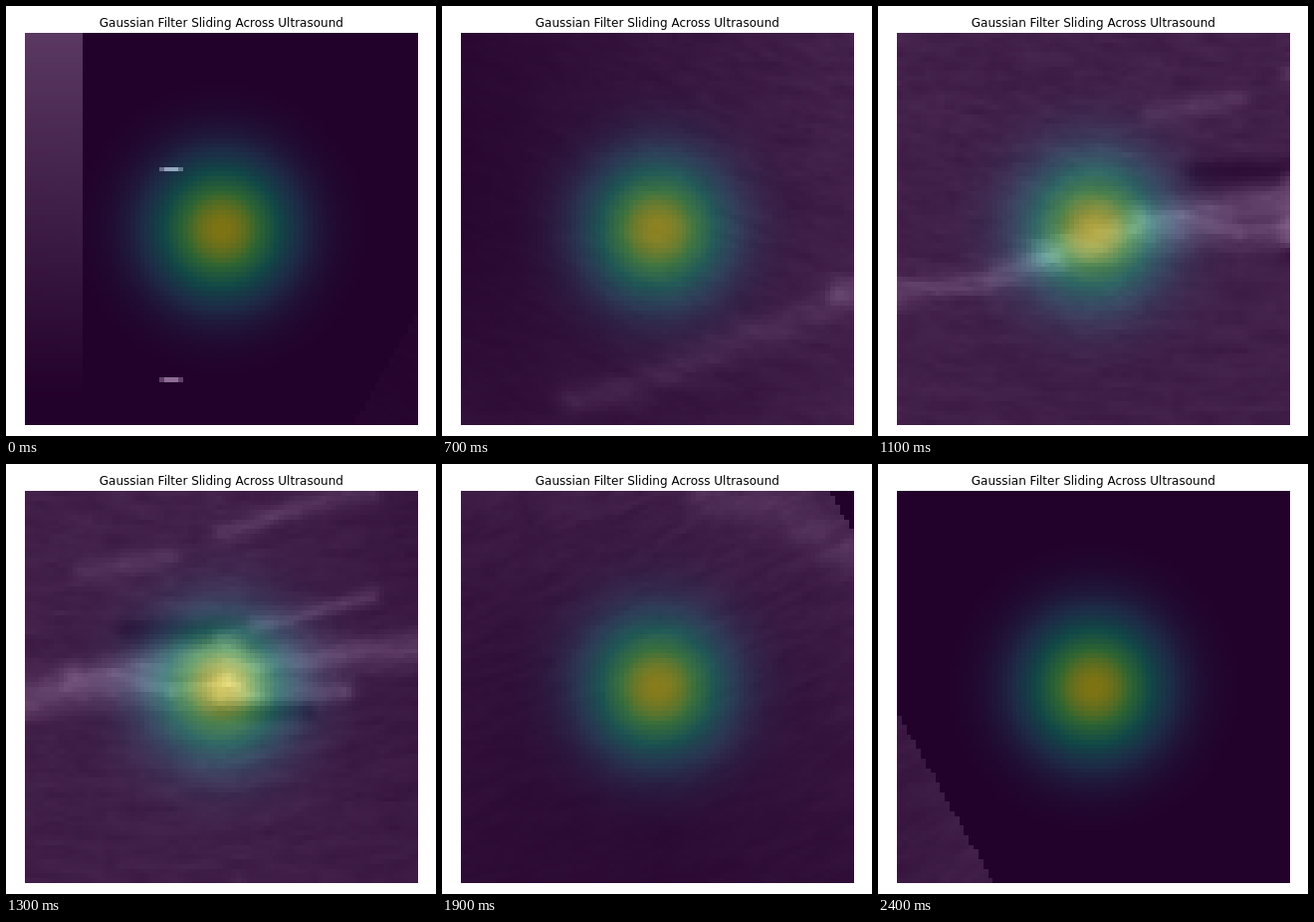
An HTML page with a canvas that plays this animation: 432 by 432 pixels, repeating every 2500 ms.

```html
<!DOCTYPE html>
<html lang="en">
<head>
<meta charset="utf-8">
<title>Gaussian Filter</title>
<style>
html, body { margin: 0; width: 432px; height: 432px; overflow: hidden; background: #fff; }
canvas { display: block; }
</style>
</head>
<body>
<canvas id="stage" width="432" height="432"></canvas>
<script>
const N = 82, STRIDE = 20.5, STEPS = 25, STEP_MS = 100, SIGMA = 10.2;
const W = Math.floor(STRIDE * (STEPS - 1)) + N;

// Scan sector: apex and half-width per row
const APEX_X = 290.4, APEX_Y = -310, SPREAD = 0.566;

// Tissue brightness every 41 columns, one line per height
const BASE_X = 61.5, BASE_DX = 41;
const top_ = [6, 8, 14, 40, 64, 60, 65, 42, 52, 60, 70, 60];
const middle = [6, 8, 12, 30, 60, 58, 60, 45, 30, 18, 46, 50];
const bottom = [8, 8, 28, 36, 60, 58, 60, 50, 22, 18, 30, 60];

// Soft streaks: thickness, brightness, then the points of a path
const streaks = [
  [2.8, 30, 167, 77, 179, 74, 196, 67, 222, 56],
  [2, 54, 222, 54, 243, 52, 258, 47],
  [2.8, 62, 256, 46.5, 276, 41, 312, 41],
  [2, 52, 276, 39, 309, 33],
  [2.6, 66, 309, 37, 333, 34, 349, 33],
  [1.8, 60, 307, 42.5, 332, 41.5],
  [1.4, 48, 307, 30.5, 327, 25, 338, 22],
  [1.5, 38, 307, 9, 325, 3, 338, 0],
  [3, 28, 440, 0, 456, 5, 471, 13],
  [1.8, 30, 278, 17, 296, 14],
  [2, -38, 288, 29, 311, 29],
  [1.5, -33, 307, 46, 325, 46],
  [1, 40, 372, 44, 380, 43.5]
];

const viridis = [[68, 1, 84], [59, 81, 139], [33, 144, 141], [92, 200, 99], [253, 231, 37]];

const mix = (a, b, t) => a + (b - a) * t;
const clamp = (v, lo, hi) => Math.min(Math.max(v, lo), hi);

function hash(i, j) {
  let h = Math.imul(i, 374761393) + Math.imul(j, 668265263);
  h = Math.imul(h ^ (h >>> 13), 1274126177);
  return ((h ^ (h >>> 16)) >>> 0) / 2 ** 31 - 1;
}

function noise(x, y) {
  const i = Math.floor(x), j = Math.floor(y), u = x - i, v = y - j;
  return mix(mix(hash(i, j), hash(i + 1, j), u), mix(hash(i, j + 1), hash(i + 1, j + 1), u), v);
}

function baseAt(x, y) {
  const c = clamp((x - BASE_X) / BASE_DX, 0, middle.length - 1.001);
  const i = Math.floor(c), r = y / N * 2;
  const along = row => mix(row[i], row[i + 1], c - i);
  return r < 1 ? mix(along(top_), along(middle), r) : mix(along(middle), along(bottom), r - 1);
}

function streakAt(x, y, [w, amp, ...p]) {
  let d2 = Infinity;
  for (let k = 0; k + 3 < p.length; k += 2) {
    const px = x - p[k], py = y - p[k + 1], dx = p[k + 2] - p[k], dy = p[k + 3] - p[k + 1];
    const t = clamp((px * dx + py * dy) / (dx * dx + dy * dy), 0, 1);
    d2 = Math.min(d2, (px - t * dx) ** 2 + (py - t * dy) ** 2);
  }
  return amp * Math.exp(-d2 / (2 * w * w));
}

function tissue(x, y) {
  const dx = x - APEX_X, dy = y - APEX_Y;
  if (Math.abs(dx) > SPREAD * dy) return 0;
  // Speckle runs along arcs around the apex
  const r = Math.hypot(dx, dy), a = Math.atan2(dx, dy) * 350;
  const speckle = 0.15 * noise(a / 6, r / 1.5) + 0.1 * noise(a / 2 + 99, r + 99);
  const level = streaks.reduce((sum, s) => sum + streakAt(x, y, s), baseAt(x, y));
  return Math.max(0, level * (1 + speckle));
}

const scan = new Float32Array(W * N);
for (let y = 0; y < N; y++)
  for (let x = 0; x < W; x++) scan[y * W + x] = tissue(x + 0.5, y + 0.5);

function mark(x, y, w, h, level) {
  for (let j = y; j < y + h; j++) scan.fill(level, j * W + x, j * W + x + w);
}

// Grey bar and scale ticks
for (let y = 0; y < N; y++) mark(0, y, 12, 1, Math.max(0, 110 * (1 - y / 76)));
function scaleTick(y, level) {
  mark(28, y, 5, 1, level * 0.58);
  mark(29, y, 3, 1, level);
}
scaleTick(28, 245);
scaleTick(72, 215);

// Cross cursor with its trailing dots
for (const k of [0, 11]) {
  mark(361 + k, 64, 7, 3, 225);
  mark(368, 57 + k, 3, 7, 225);
}
mark(368, 57, 3, 1, 165);
mark(369, 65, 1, 2, 120);
mark(363, 71, 1, 1, 100);
mark(364, 72, 1, 1, 190);
mark(358, 78, 3, 1, 110);
mark(359, 77, 1, 3, 110);
mark(359, 78, 1, 1, 235);

// Filter colours, already halved for the 50% overlay
const filter = [];
for (let y = 0; y < N; y++)
  for (let x = 0; x < N; x++) {
    const c = (N - 1) / 2;
    const v = 3.999 * Math.exp(-((x - c) ** 2 + (y - c) ** 2) / (2 * SIGMA * SIGMA));
    const i = Math.floor(v);
    filter.push(viridis[i].map((p, k) => mix(p, viridis[i + 1][k], v - i) / 2));
  }

const ctx = document.getElementById('stage').getContext('2d');
const tile = document.createElement('canvas');
tile.width = tile.height = N;
const tileCtx = tile.getContext('2d');
const pixels = tileCtx.createImageData(N, N);

function draw(step) {
  const left = Math.floor(step * STRIDE);
  filter.forEach((rgb, i) => {
    const g = scan[Math.floor(i / N) * W + left + i % N] / 2;
    pixels.data.set([rgb[0] + g, rgb[1] + g, rgb[2] + g, 255], i * 4);
  });
  tileCtx.putImageData(pixels, 0, 0);
  ctx.fillStyle = '#fff';
  ctx.fillRect(0, 0, 432, 432);
  ctx.imageSmoothingEnabled = false;
  ctx.drawImage(tile, 19, 27, 395, 394);
  ctx.fillStyle = '#000';
  ctx.font = '12px "DejaVu Sans", sans-serif';
  ctx.textAlign = 'center';
  ctx.fillText('Gaussian Filter Sliding Across Ultrasound', 216.3, 21);
}

const start = performance.now();
let shown = -1;
function tick() {
  const step = Math.floor((performance.now() - start) / STEP_MS) % STEPS;
  if (step !== shown) draw(shown = step);
  requestAnimationFrame(tick);
}
tick();
</script>
</body>
</html>
```
